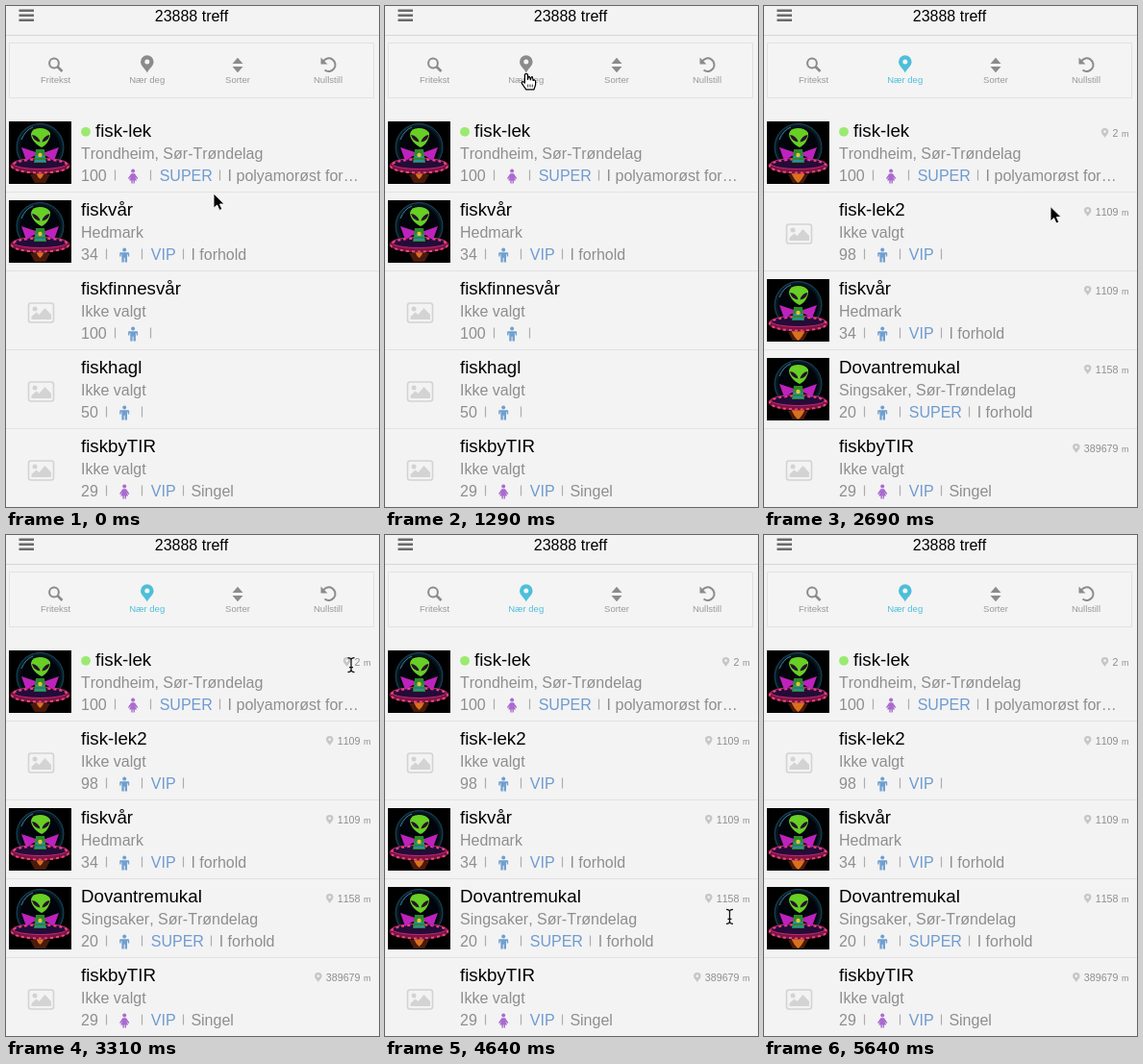
These frames come from a looping animation (388 by 521 pixels, 5.72 s). An HTML page:

```html
<!DOCTYPE html>
<html lang="no">
<head>
<meta charset="utf-8">
<title>Treffliste</title>
<style>
  html, body { margin: 0; width: 100%; height: 100%; overflow: hidden; background: #f3f3f3; }
  svg { display: block; width: 388px; height: 521px; }
  text { font-family: "Liberation Sans", Arial, sans-serif; font-size: 16px; font-kerning: none; fill: #8e8e8e; }
  .head, .name { fill: #000; }
  .name { font-size: 18.72px; }
  .label { font-size: 9.5px; fill: #999; text-anchor: middle; }
  .dist { font-size: 10.7px; text-anchor: end; }
  .unit { font-size: 9px; }
  .level { fill: #6f9bd0; }
  .rule { stroke: #e2e2e2; }
  .bar { stroke: #acacac; stroke-width: 1.2; }
  .active, .active text { fill: #4cbfd9; }
</style>
</head>
<body>
<svg viewBox="0 0 388 521">
  <defs>
    <path id="pin" fill-rule="evenodd" d="M0 9C-1.5 5-6.8 2-6.8-2.5A6.8 6.8 0 0 1 6.8-2.5C6.8 2 1.5 5 0 9ZM0-5A2.5 2.5 0 1 0 0 0 2.5 2.5 0 1 0 0-5Z"/>
    <g id="man" fill="#6f9fd0">
      <circle cy="-5.4" r="2"/>
      <path d="M-4-2.8h8q1 0 1 1V1.6H3.6V-.8H2.8V7.4H.5V2.8H-.5V7.4h-2.3V-.8h-.8v2.4H-5v-3.4q0-1 1-1Z"/>
    </g>
    <g id="woman" fill="#a96bcf">
      <circle cy="-5.4" r="2"/>
      <path d="M-1.8-2.8h3.6L5.2 2.2 4 3 2 .4 4 4.6H1.8v2.8H.4V4.6H-.4v2.8h-1.4V4.6H-4L-2 .4-4 3-5.2 2.2Z"/>
    </g>
    <g id="blank">
      <rect x="-13" y="-10" width="26" height="20" rx="2.5" fill="none" stroke="#d3d3d3" stroke-width="1.6"/>
      <circle cx="-6.5" cy="-4" r="2.5" fill="#d3d3d3"/>
      <path d="M-10 7v-3l5-4.5 3 2.5L4-5l6.5 7v5Z" fill="#d3d3d3"/>
    </g>
    <radialGradient id="glow">
      <stop offset=".8" stop-color="#01040a"/>
      <stop offset="1" stop-color="#0b2634"/>
    </radialGradient>
    <g id="avatar">
      <rect width="65" height="65"/>
      <circle cx="32.5" cy="27" r="24.5" fill="url(#glow)" stroke="#1f4d61" stroke-width=".9"/>
      <path d="M13 19Q17 9 25 6" fill="none" stroke="#3f7f92"/>
      <path d="M22 55h21l-5 9H27Z" fill="#4a1a0c"/>
      <path id="flame" d="M-7 0Q-4 7 0 10 4 7 7 0Z" fill="#d9711c"/>
      <ellipse cx="32.5" cy="46" rx="31" ry="8.5" fill="#7d1440"/>
      <ellipse cx="32.5" cy="44" rx="28" ry="5.5" fill="#240c38" stroke="#c12a78"/>
      <ellipse id="rim" cx="32.5" cy="46.5" rx="29.5" ry="7" fill="none" stroke="#e8487c" stroke-width="2" stroke-dasharray="3 3"/>
      <path d="M13 27 28 32H38L52 27 47 41 39 36H26L18 41Z" fill="#bd22bd"/>
      <path d="M28 29h9l2 14H26Z" fill="#2c8a2a"/>
      <path d="M28 37h9M27 41h11" stroke="#2d8fd0" stroke-width="1.6"/>
      <circle cx="32.5" cy="35" r="2.2" fill="#e0c534"/>
      <path d="M34 27C29 25 23 19 23 13Q24 7 32 7T43 12C44 18 38 26 34 27Z" fill="#68cf25"/>
      <path d="M24 14Q31 15 32.5 21.5 26 21 24 14ZM42.5 14Q36 15 34.5 21.5 41 21 42.5 14Z" fill="#26102e"/>
    </g>
  </defs>

  <rect width="388" height="521" fill="#f3f3f3"/>
  <path d="M13.5 4.8h15.5M13.5 9.8h15.5M13.5 14.8h15.5" stroke="#6a6a6a" stroke-width="2.4"/>
  <text class="head" x="193" y="16" text-anchor="middle">23888 treff</text>
  <path class="rule" d="M0 30.5H388" style="stroke:#d4d4d4"/>
  <rect class="rule" x="3.5" y="38.5" width="379" height="57" fill="#f4f4f4"/>
  <g fill="none" stroke="#8b8b8b" stroke-width="2">
    <circle cx="50" cy="59.5" r="4.9"/>
    <path d="M53.5 63 58.5 68" stroke-width="2.6"/>
    <path d="M330 57.5A6.8 6.8 0 1 1 331.5 66.5"/>
  </g>
  <path d="M235.5 60 241 53.8 246.5 60ZM235.5 63 241 69.2 246.5 63ZM327.5 53.5v7h7Z" fill="#8b8b8b"/>
  <text class="label" x="51.5" y="80.3">Fritekst</text>
  <g id="near" fill="#8b8b8b">
    <use href="#pin" x="146.8" y="60.6"/>
    <text class="label" x="146.7" y="80.3">Nær deg</text>
  </g>
  <text class="label" x="241" y="80.3">Sorter</text>
  <text class="label" x="335" y="80.3">Nullstill</text>
  <path class="rule" d="M0 193.5H388M0 275.5H388M0 357.5H388M0 439.5H388"/>

  <g id="before"></g>
  <g id="after"></g>

  <g id="arrow"><path d="M0 0V15.2L3.6 12 6 17.4 8.8 16.2 6.4 11H11.2Z" stroke="#fff" stroke-width=".9"/></g>
  <g id="hand">
    <path d="M-1.6 1.4Q0-.8 1.5 1.4V6.4Q3 0 4.4 6.8 6 0 7.1 7.4 9 6 9.6 8.4V12L8 16.8H-.2L-4.6 10.6Q-5 7-1.6 10Z" fill="#fff" stroke="#000" stroke-width="1.2" stroke-linejoin="round"/>
    <path d="M1.7 11.5v3M4 11.5v3M6.3 11.5v3" stroke="#000" stroke-width=".8"/>
  </g>
  <g id="beam">
    <path d="M-3.5-7.5Q0-7.5 0-5 0-7.5 3.5-7.5M0-5.5V5.5M-2 2.5H2M-3.5 7.5Q0 7.5 0 5 0 7.5 3.5 7.5" fill="none" stroke="#111" stroke-width="1.3"/>
  </g>
</svg>
<script>
const LOOP = 5720, ACTIVE_AT = 1400, SORTED_AT = 1640;
const $ = id => document.getElementById(id);

const eir = { name: 'fisk-lek', online: 1, place: 'Trondheim, Sør-Trøndelag', age: 100, sex: 'woman', level: 'SUPER', status: 'I polyamorøst for…', photo: 1 };
const vip = { name: 'fiskvår', place: 'Hedmark', age: 34, sex: 'man', level: 'VIP', status: 'I forhold', photo: 1 };
const last = { name: 'fiskbyTIR', age: 29, sex: 'woman', level: 'VIP', status: 'Singel' };

const before = [
  eir, vip,
  { name: 'fiskfinnesvår', age: 100, sex: 'man' },
  { name: 'fiskhagl', age: 50, sex: 'man' },
  last
];
const after = [
  { ...eir, dist: 2 },
  { name: 'fisk-lek2', age: 98, sex: 'man', level: 'VIP', dist: 1109 },
  { ...vip, dist: 1109 },
  { name: 'Dovantremukal', place: 'Singsaker, Sør-Trøndelag', age: 20, sex: 'man', level: 'SUPER', status: 'I forhold', photo: 1, dist: 1158 },
  { ...last, dist: 389679 }
];

const text = (x, y, str, cls = '') => `<text class="${cls}" x="${x}" y="${y}">${str}</text>`;
const bar = x => `<path class="bar" d="M${Math.floor(x) + .5} 50.5V61.5"/>`;

function row(p, i) {
  const end = 78 + String(p.age).length * 8.9;
  let s = p.photo ? '<use href="#avatar" x="3"/>' : '<use href="#blank" x="36.5" y="35"/>';
  if (p.online) s += '<circle cx="83" cy="10.8" r="4.9" fill="#9bea70"/>';
  s += text(p.online ? 93 : 78, 16, p.name, 'name');
  s += text(78, 39, p.place || 'Ikke valgt') + text(78, 62, p.age);
  s += bar(end + 8.5) + `<use href="#${p.sex}" x="${end + 27.4}" y="57"/>` + bar(end + 46);
  if (p.level) {
    const x = end + 55, stop = x + (p.level === 'VIP' ? 25.8 : 55.1);
    s += text(x, 62, p.level, 'level') + bar(stop + 8) + text(stop + 15.8, 62, p.status || '');
  }
  if (p.dist) {
    const x = 368.5 - String(p.dist).length * 5.95 - 8;
    s += `<use href="#pin" fill="#c6c6c6" transform="translate(${x} 12) scale(.55)"/>`;
    s += text(368.5, 16, p.dist, 'dist') + text(372, 16, 'm', 'unit');
  }
  return `<g transform="translate(0 ${120 + 82 * i})">${s}</g>`;
}

$('before').innerHTML = before.map(row).join('');
$('after').innerHTML = after.map(row).join('');

// Saucer cycle: flame strength for each 100 ms step
const thrust = [.6, .65, 1, .6, .8, .6];

// Pointer: time, x, y, shape from then on
const path = [
  [0, 216, 195, 'arrow'], [300, 216, 195, 'arrow'], [640, 198, 170, 'arrow'],
  [800, 180, 138, 'arrow'], [980, 154, 86, 'hand'], [1170, 147, 70, 'hand'],
  [1640, 147, 70, 'hand'], [1760, 152, 108, 'arrow'], [1900, 162, 180, 'beam'],
  [2110, 168, 257, 'beam'], [2290, 170, 257, 'beam'], [2600, 270, 224, 'arrow'],
  [2860, 350, 180, 'arrow'], [3100, 374, 142, 'arrow'], [3250, 361, 135, 'beam'],
  [3310, 359, 135, 'beam'], [3400, 360, 142, 'beam'], [3550, 361, 170, 'arrow'],
  [4000, 354, 200, 'beam'], [4180, 352, 213, 'beam'], [4270, 353, 232, 'arrow'],
  [4400, 357, 290, 'beam'], [4480, 358, 320, 'arrow'], [4580, 358, 378, 'beam'],
  [4700, 359, 415, 'arrow'], [4850, 357, 466, 'arrow'], [5010, 355, 526, 'arrow'],
  [LOOP, 355, 526, 'arrow']
];

function movePointer(t) {
  const n = path.findIndex(k => k[0] > t);
  const [t0, x0, y0, shape] = path[n - 1], [t1, x1, y1] = path[n];
  const f = (t - t0) / (t1 - t0);
  for (const id of ['arrow', 'hand', 'beam']) {
    $(id).style.display = id === shape ? '' : 'none';
  }
  $(shape).setAttribute('transform', `translate(${x0 + (x1 - x0) * f} ${y0 + (y1 - y0) * f})`);
}

function draw(t) {
  const step = Math.floor(t % 600 / 100);
  $('rim').setAttribute('stroke-dashoffset', step * 2);
  $('flame').setAttribute('transform', `translate(32.5 54) scale(${thrust[step]})`);
  $('near').classList.toggle('active', t >= ACTIVE_AT);
  $('before').style.display = t < SORTED_AT ? '' : 'none';
  $('after').style.display = t < SORTED_AT ? 'none' : '';
  movePointer(t);
}

const start = performance.now();
function tick() {
  draw((performance.now() - start) % LOOP);
  requestAnimationFrame(tick);
}
tick();
</script>
</body>
</html>
```
